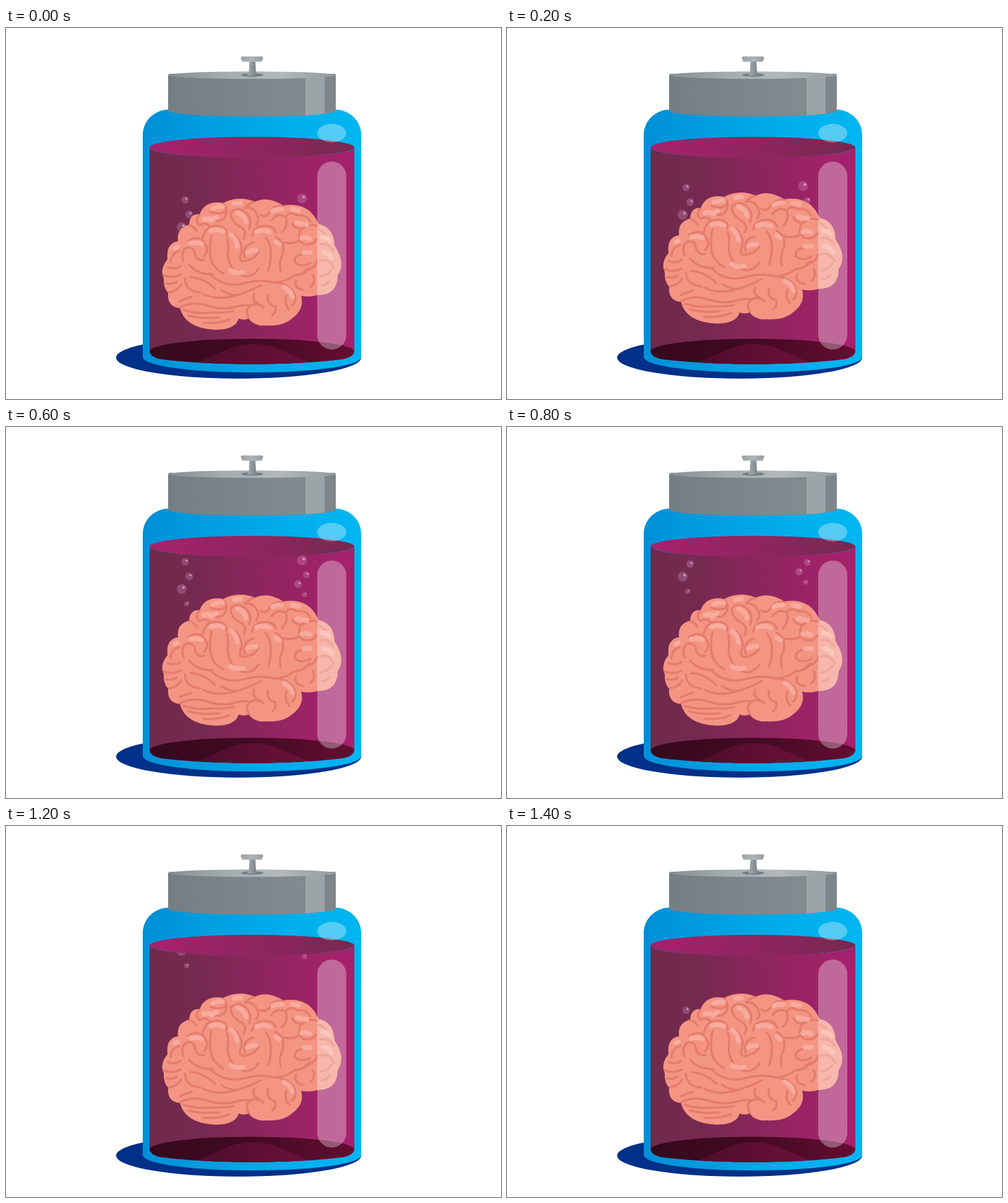
Recreate the animation shown at these times as an HTML page with a canvas. Size 800x600 px, loop 1.6 s.

```html
<!DOCTYPE html>
<html lang="en">
<head>
<meta charset="utf-8">
<title>Brain in a jar</title>
<style>
html, body { margin: 0; width: 100%; height: 100%; overflow: hidden; background: #fff; }
canvas { display: block; }
</style>
</head>
<body>
<canvas id="stage" width="800" height="600"></canvas>
<script>
const ctx = document.getElementById('stage').getContext('2d');
const LOOP = 1600, STEP = 200;

// Vertical offset of the brain at each step
const bob = [0, -10, -20, -5, -5, -5, -5, -5];

// x, y at step 0, radius, first and last visible step
const bubbles = [
  [289.5, 278, 6, -1, 4], [296, 301.5, 6.2, 0, 5], [284, 322, 8, 0, 6],
  [478.5, 275.7, 8, 0, 4], [485.5, 299, 5.5, 0, 4],
  [292, 346, 4.2, 3, 6], [472, 314, 6.2, 3, 5], [482.5, 331, 4, 3, 6]
];

const jar = new Path2D('M221 173C221 150 240 132 263 132H532C555 132 574 150 574 173V532C574 546 500 557 398 557C296 557 221 546 221 532Z');
const liquid = new Path2D('M232 193C232 215 563 215 563 193V521Q563 532 545 535.5Q480 543.5 398 543.5Q315 543.5 250 535.5Q232 532 232 521Z');
const floor = new Path2D('M232 523A165.5 20.5 0 0 1 563 523V545H232Z');
const mound = new Path2D('M300 545Q340 527 364 517Q398 505 434 517Q466 531 500 545Z');
const lid = new Path2D('M262 77Q262 74 266 74H529Q533 74 533 77V135C505 146 290 146 262 135Z');
const stem = new Path2D('M393.5 54H403L404 71Q405 75 407 77H389Q392 75 392.5 71Z');
const cap = new Path2D('M382 46H413Q416 46 415.5 49L413 54.5H382L379.5 49Q379 46 382 46Z');

const brain = new Path2D(
  'M255 405Q248 390 261 374Q258 348 278 345Q275 324 296 318Q297 300 313 301Q322 278 351 283Q376 270 402 281Q423 271 448 287' +
  'Q490 280 505 317Q530 322 531 352Q550 380 536 400Q536 432 503 432Q490 436 477 433Q483 455 462 470Q447 483 420 481' +
  'Q402 483 392 470Q384 473 376 470Q371 488 338 488Q290 486 281 453Q260 451 262 428Q254 420 255 405Z');

const grooves = [
  // upper left
  'M296 319Q304 321 308 328M313 301Q304 312 313 319Q322 313 329 321M330 297Q345 304 357 295' +
  'M351 284Q362 297 351 309Q346 314 338 311M384 341Q391 328 378 321Q364 314 363 299Q373 288 386 297Q399 308 393 324' +
  'M386 290Q399 289 405 300Q411 311 404 318M402 281Q391 284 387 291',
  // upper right
  'M448 288Q431 286 425 300Q418 307 411 302M429 311Q438 298 452 305Q457 320 446 330' +
  'M453 304Q459 296 470 303Q486 301 492 313M504 320Q488 315 479 325Q466 325 463 316M477 325Q469 340 480 349Q495 353 502 342' +
  'M505 326Q520 331 520 347M508 350Q521 347 529 360M508 376Q522 372 530 388M508 402Q521 400 526 391M510 416Q517 416 522 410',
  // centre
  'M318 340Q322 319 342 320Q359 322 356 335M332 336Q326 370 336 384Q342 392 351 397M357 340Q361 350 358 366Q362 398 388 402Q402 400 408 389' +
  'M370 335Q386 352 379 366Q375 380 389 376Q405 372 408 361M386 372Q381 352 400 347M398 336Q400 321 418 320Q433 320 436 331' +
  'M420 339Q434 356 424 392M436 338Q452 346 447 367Q440 380 444 394M449 347Q466 351 478 341',
  // left
  'M266 379Q267 363 280 361M287 378Q281 360 293 355Q305 354 305 365Q309 378 320 375M294 345Q313 333 322 349Q329 360 320 369' +
  'M255 400Q269 406 282 399M261 387Q274 391 282 385M263 428Q278 425 283 415M259 413Q270 415 276 410M296 383Q310 399 334 398' +
  'M289 405Q290 426 314 428M298 403Q320 404 338 422M281 442Q292 437 300 435',
  // lower
  'M330 398Q350 419 380 414Q410 405 436 412Q456 409 466 400Q483 399 490 387M319 430Q340 441 370 433Q396 425 412 416M348 424Q360 432 372 432' +
  'M281 452Q300 442 322 448Q350 458 374 450Q384 447 397 449M287 456Q310 463 330 460Q352 461 367 458M295 465Q318 471 344 468M319 477Q341 479 362 471',
  // lower right
  'M440 412Q464 417 468 436Q468 446 462 449M423 431Q421 447 435 450M453 433Q449 447 458 456M393 470Q383 453 400 447Q411 446 416 452' +
  'M401 430Q397 441 408 446M435 450Q438 459 430 465M478 366Q465 368 467 379Q476 388 492 380M469 408Q464 421 481 424' +
  'M484 392Q500 389 503 376M496 400Q501 411 492 419'
].map(d => new Path2D(d));

const shines = new Path2D(
  'M334 292Q342 288 350 289M369 284L379 283M320 309L328 308L332 311L340 306M374 299Q386 303 388 314' +
  'M331 328Q341 324 351 329M298 348Q307 346 316 349M364 335Q373 341 374 353M405 329Q416 325 426 330M431 296Q438 292 446 293' +
  'M462 293L473 295M470 315L486 318M436 346L442 350M390 363Q396 359 404 360M363 392Q373 398 383 395M478 340Q485 337 491 341' +
  'M482 363H492M511 338Q519 338 523 344M513 363Q523 364 526 372M449 419Q460 424 463 435M273 356L277 354');

function gradient(x0, x1, ...colors) {
  const g = ctx.createLinearGradient(x0, 0, x1, 0);
  colors.forEach((c, i) => g.addColorStop(i / (colors.length - 1), c));
  return g;
}

function fill(path, color) {
  ctx.fillStyle = color;
  ctx.fill(path);
}

function stroke(path, color, width) {
  ctx.strokeStyle = color;
  ctx.lineWidth = width;
  ctx.stroke(path);
}

function oval(x, y, rx, ry, color) {
  ctx.beginPath();
  ctx.ellipse(x, y, rx, ry, 0, 0, Math.PI * 2);
  ctx.fillStyle = color;
  ctx.fill();
}

function pill(x, y, w, h, r, color) {
  ctx.beginPath();
  ctx.roundRect(x, y, w, h, r);
  ctx.fillStyle = color;
  ctx.fill();
}

const paint = {
  glass: gradient(221, 574, '#008fd6', '#009fe2', '#00aeed', '#00b6f1'),
  liquid: gradient(232, 563, '#6f2a4b', '#762950', '#8a265c', '#9b2366', '#a8206d'),
  surface: gradient(232, 563, '#a8206d', '#972464', '#88265b', '#75294f'),
  floor: gradient(232, 563, '#36091d', '#420a22', '#650d32'),
  mound: gradient(300, 500, '#4d0d2a', '#6e1038'),
  lid: gradient(262, 484, '#747e84', '#838b8f'),
  top: gradient(262, 533, '#858f94', '#a4abae', '#b2b8bb', '#939b9f'),
  cap: gradient(379, 416, '#9da2a5', '#b2b4b5', '#969b9e'),
  stem: gradient(392, 405, '#a0a5a8', '#7c8489')
};

function drawJar() {
  oval(376, 533, 198, 34, '#003087');
  fill(jar, paint.glass);
  fill(liquid, paint.liquid);
  oval(397.5, 193, 165.5, 17, paint.surface);
  ctx.save();
  ctx.clip(liquid);
  fill(floor, paint.floor);
  fill(mound, paint.mound);
  ctx.restore();
}

function drawLid() {
  fill(lid, paint.lid);
  ctx.save();
  ctx.clip(lid);
  ctx.fillStyle = '#9ca4a7';
  ctx.fillRect(484, 70, 31, 80);
  ctx.fillStyle = '#7d868b';
  ctx.fillRect(515, 70, 20, 80);
  ctx.restore();
  oval(397.5, 76.3, 135.5, 6, paint.top);
  oval(398, 76, 18, 2.8, '#747d82');
  fill(stem, paint.stem);
  fill(cap, paint.cap);
}

function drawBubbles(step) {
  ctx.save();
  ctx.clip(liquid);
  const k = step === 7 ? -1 : step;
  for (const [x, y0, r, from, to] of bubbles) {
    if (k < from || k > to) continue;
    const y = y0 - 20 * k;
    oval(x, y, r, r, 'rgba(215,155,200,.3)');
    oval(x + r * .35, y - r * .3, r * .27, r * .27, 'rgba(255,225,245,.5)');
  }
  ctx.restore();
}

function drawBrain(dy) {
  ctx.save();
  ctx.translate(0, dy);
  ctx.lineCap = ctx.lineJoin = 'round';
  fill(brain, '#f49583');
  ctx.clip(brain);
  grooves.forEach(g => stroke(g, '#e57c6e', 3.6));
  stroke(shines, '#f8ab9e', 7.5);
  ctx.restore();
}

function frame(now) {
  const step = Math.floor((now % LOOP) / STEP);
  ctx.fillStyle = '#fff';
  ctx.fillRect(0, 0, 800, 600);
  drawJar();
  drawLid();
  drawBubbles(step);
  drawBrain(bob[step]);
  oval(526.5, 170, 23.5, 15, 'rgba(255,255,255,.33)');
  pill(503, 216, 47, 304, 23.5, 'rgba(255,255,255,.32)');
}

const start = performance.now();
function tick() {
  frame(performance.now() - start);
  requestAnimationFrame(tick);
}
tick();
</script>
</body>
</html>
```
